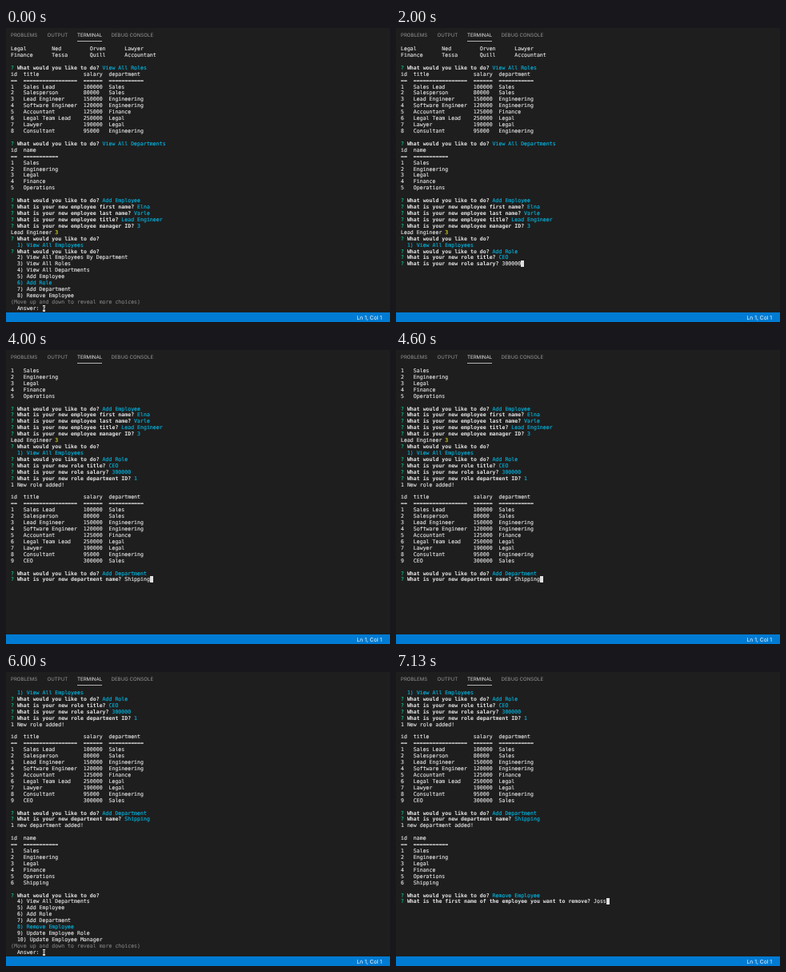
Recreate the animation shown at these times as an HTML page. Size 480 by 368 pixels, loop 8 s.

```html
<!DOCTYPE html>
<html lang="en">
<head>
<meta charset="utf-8">
<title>Employee tracker terminal</title>
<style>
html, body { margin: 0; width: 100%; height: 100%; overflow: hidden; background: #1e1e1e; }
#stage {
  position: relative; width: 480px; height: 368px; overflow: hidden;
  background: #1e1e1e; font-family: Inter, Roboto, sans-serif;
  text-rendering: geometricPrecision;
}
.tab { position: absolute; top: 5px; font-size: 6.15px; line-height: 10px; color: #989898; white-space: nowrap; }
.tab.on { color: #e7e7e7; }
.tab.on::after { content: ""; position: absolute; left: 0; right: 0; top: 11px; height: 1px; background: #b4b4b4; }
#bar {
  position: absolute; left: 0; top: 356px; width: 470px; height: 12px; padding-right: 10px;
  background: #007bd3; color: #fff; font-size: 6.75px; line-height: 13px; text-align: right;
}
#view { position: absolute; left: 6px; top: 23px; width: 470px; height: 333px; overflow: hidden; }
#reel { animation: play 8s steps(8) infinite; }
@keyframes play { to { transform: translateY(-100%); } }
pre {
  margin: 0; height: 333px; overflow: hidden; color: #e8e8e8;
  font: 6.578px/7.925px "DejaVu Sans Mono", "Liberation Mono", monospace;
  -webkit-text-stroke: .12px;
}
b { -webkit-text-stroke: 0; }
.mark { color: #10cc84; }
.pick { color: #00b8e4; }
.num { color: #f0f010; }
.hint { color: #7c7c7c; }
.cursor { background: #e0e0e0; color: #1e1e1e; }
</style>
</head>
<body>
<div id="stage">
  <div class="tab" style="left:6px">PROBLEMS</div>
  <div class="tab" style="left:51.5px">OUTPUT</div>
  <div class="tab on" style="left:89px">TERMINAL</div>
  <div class="tab" style="left:131.5px">DEBUG CONSOLE</div>
  <div id="view"><div id="reel"></div></div>
  <div id="bar">Ln 1, Col 1</div>
</div>
<script>
const span = (cls, text) => `<span class="${cls}">${text}</span>`;
const cursor = (ch = " ") => span("cursor", ch);
const ask = (question, rest = "") => `${span("mark", "?")} <b>${question}</b> ${rest}`;
const done = (question, answer) => ask(question, span("pick", answer));
const typing = (question, text) => ask(question, text + cursor());

const TODO = "What would you like to do?";
const TITLE = "What is your new role title?";
const SALARY = "What is your new role salary?";
const DEPT = "What is your new department name?";
const REMOVE = "What is the first name of the employee you want to remove?";

function table(head, widths, rows) {
  const line = cells => cells.map((c, i) => String(c).padEnd(widths[i])).join("  ");
  const rule = widths.map(w => "=".repeat(w));
  return [head, rule, ...rows].map(line).concat("");
}

const numbered = rows => rows.map((row, i) => [i + 1, ...row]);
const roles = numbered([
  ["Sales Lead", 100000, "Sales"],
  ["Salesperson", 80000, "Sales"],
  ["Lead Engineer", 150000, "Engineering"],
  ["Software Engineer", 120000, "Engineering"],
  ["Accountant", 125000, "Finance"],
  ["Legal Team Lead", 250000, "Legal"],
  ["Lawyer", 190000, "Legal"],
  ["Consultant", 95000, "Engineering"]
]);
const departments = ["Sales", "Engineering", "Legal", "Finance", "Operations"];
const roleTable = rows => table(["id", "title", "salary", "department"], [2, 17, 6, 11], rows);
const deptTable = names => table(["id", "name"], [2, 11], numbered(names.map(n => [n])));
const person = (dept, first, last, title) =>
  dept.padEnd(13) + first.padEnd(12) + last.padEnd(11) + title;

const choices = [
  "View All Employees", "View All Employees By Department", "View All Roles",
  "View All Departments", "Add Employee", "Add Role", "Add Department",
  "Remove Employee", "Update Employee Role", "Update Employee Manager"
];

function choice(n, picked) {
  const text = `  ${n}) ${choices[n - 1]}`;
  return n === picked ? span("pick", text) : text;
}

function menu(first, last, picked, answer) {
  const list = [];
  for (let n = first; n <= last; n++) list.push(choice(n, picked));
  return [ask(TODO), ...list,
    span("hint", "(Move up and down to reveal more choices)"),
    "  Answer: " + cursor(answer)];
}

const log = [
  person("Legal", "Ned", "Orven", "Lawyer"),
  person("Finance", "Tessa", "Quill", "Accountant"),
  "",
  done(TODO, "View All Roles"),
  ...roleTable(roles),
  done(TODO, "View All Departments"),
  ...deptTable(departments),
  done(TODO, "Add Employee"),
  done("What is your new employee first name?", "Elna"),
  done("What is your new employee last name?", "Varle"),
  done("What is your new employee title?", "Lead Engineer"),
  done("What is your new employee manager ID?", "3"),
  "Lead Engineer " + span("num", "3"),
  ask(TODO),
  choice(1, 1),
  done(TODO, "Add Role"),
  done(TITLE, "CEO"),
  done(SALARY, "300000"),
  done("What is your new role department ID?", "1"),
  "1 New role added!",
  "",
  ...roleTable([...roles, [9, "CEO", 300000, "Sales"]]),
  done(TODO, "Add Department"),
  done(DEPT, "Shipping"),
  "1 new department added!",
  "",
  ...deptTable([...departments, "Shipping"]),
  done(TODO, "Remove Employee")
];

// One scene per second: first log line shown, end of the log, live lines below it.
const scenes = [
  [0, 32, menu(2, 8, 6, "6")],
  [0, 33, [typing(TITLE, "CEO")]],
  [0, 34, [typing(SALARY, "300000")]],
  [17, 50, menu(1, 6, 1)],
  [18, 51, [typing(DEPT, "Shipping")]],
  [30, 63, menu(1, 6, 1)],
  [31, 63, menu(4, 10, 8, "8")],
  [31, 64, [typing(REMOVE, "Joss")]]
];

document.getElementById("reel").innerHTML = scenes
  .map(([top, end, live]) => `<pre>${[...log.slice(top, end), ...live].join("\n")}</pre>`)
  .join("");
</script>
</body>
</html>
```
